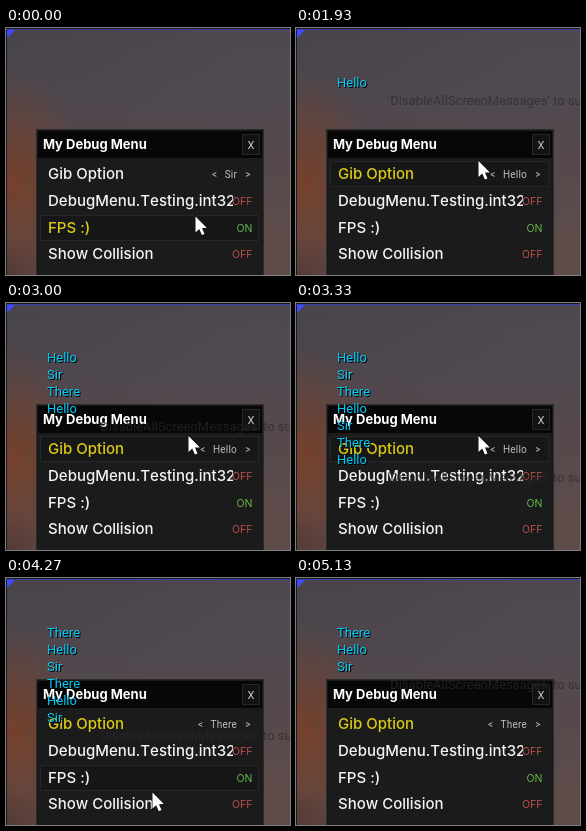
An HTML page with a canvas that plays this animation: 284x247 px, repeating every 5200 ms.

```html
<!DOCTYPE html>
<html>
<head>
<meta charset="utf-8">
<style>
html, body { margin: 0; width: 100%; height: 100%; overflow: hidden; background: #4a464c; }
canvas { display: block; }
</style>
</head>
<body>
<canvas id="stage" width="284" height="247"></canvas>
<script>
const g = document.getElementById('stage').getContext('2d');
const LOOP = 5200, STEP = 200 / 3;
const OPTIONS = ['Sir', 'Hello', 'There'];
const CLICKS = [1500, 2050, 2400, 2800, 3070, 3200, 3330, 3500];
const MESSAGE_LIFE = 2000;
const ROWS = ['Gib Option', 'DebugMenu.Testing.int32', 'FPS :)', 'Show Collision'];
const VALUES = ['', 'OFF', 'ON', 'OFF'];
const INTER = 'Inter, sans-serif', ROBOTO = 'Roboto, sans-serif';

// time, x, y of the pointer tip
const PATH = [[0, 189.5, 188.5], [130, 189.5, 188.5], [800, 182.5, 133], [3740, 182.5, 133],
  [4266, 146.5, 214.5], [4530, 132, 262], [LOOP, 132, 262]];

function pointer(t) {
  const i = PATH.findIndex(p => p[0] > t);
  const [t0, x0, y0] = PATH[i - 1], [t1, x1, y1] = PATH[i];
  const u = (t - t0) / (t1 - t0);
  const e = i === 2 ? u * u * (3 - 2 * u) : i === 4 ? u * u * (2 - u) : u;
  return [x0 + (x1 - x0) * e, y0 + (y1 - y0) * e];
}

function text(s, x, y, font, color, align = 'left') {
  g.font = font;
  g.fontKerning = 'none';
  g.fillStyle = color;
  g.textAlign = align;
  g.fillText(s, x, y);
}

function box(x, y, w, h, fill, line) {
  g.fillStyle = fill;
  g.fillRect(x, y, w, h);
  if (line) {
    g.strokeStyle = line;
    g.lineWidth = 1;
    g.strokeRect(x + .5, y + .5, w - 1, h - 1);
  }
}

function glow(x, y, rx, ry, rgb, alpha) {
  g.save();
  g.translate(x, y);
  g.scale(rx, ry);
  const r = g.createRadialGradient(0, 0, 0, 0, 0, 1);
  r.addColorStop(0, `rgba(${rgb},${alpha})`);
  r.addColorStop(.5, `rgba(${rgb},${alpha * .5})`);
  r.addColorStop(1, `rgba(${rgb},0)`);
  g.fillStyle = r;
  g.fillRect(-1, -1, 2, 2);
  g.restore();
}

function backdrop() {
  const sky = g.createLinearGradient(0, 0, 40, 247);
  sky.addColorStop(0, '#48444a');
  sky.addColorStop(.4, '#50484e');
  sky.addColorStop(.75, '#57494b');
  sky.addColorStop(1, '#5e4c4b');
  g.fillStyle = sky;
  g.fillRect(0, 0, 284, 247);
  glow(250, 40, 170, 90, '82,76,90', .4);
  glow(6, 155, 75, 110, '126,62,34', .8);
  glow(0, 247, 50, 40, '70,40,36', .5);
  box(0, 0, 1, 247, '#19181c');
  box(0, 0, 284, 1, '#19181c');
  box(0, 1, 284, 1, '#3a3fae');
  g.fillStyle = '#3d4cff';
  g.beginPath();
  g.moveTo(1, 2);
  g.lineTo(9, 2);
  g.lineTo(1, 10);
  g.fill();
}

function menu(option, hover, focus) {
  box(30, 101, 228, 160, '#1b1b1c', '#2b2a2b');
  box(32, 103, 224, 27, '#070707');
  text('My Debug Menu', 37, 121, `bold 13px ${INTER}`, '#fff');
  box(236, 106, 18, 21, '#121212', '#262626');
  text('X', 245, 120.5, `11px ${ROBOTO}`, '#c8c8c8', 'center');

  ROWS.forEach((label, i) => {
    const y = Math.round(146 + i * 26.8);
    if (i === hover) box(34, y - 13, 219, 26, '#171717', '#272727');
    g.save();
    g.beginPath();
    g.rect(34, y - 13, 193, 27);
    g.clip();
    text(label, 42, y + 5, `500 15px ${INTER}`, i === focus ? '#dccb16' : '#f4f4f4');
    g.restore();
    if (VALUES[i]) {
      text(VALUES[i], 246.5, y + 4, `10.5px ${INTER}`, VALUES[i] === 'ON' ? '#62b84a' : '#b8504a', 'right');
    } else {
      const font = `10px ${ROBOTO}`, color = '#bdbdbd';
      g.letterSpacing = '.2px';
      text(option, 231, y + 4, font, color, 'right');
      const left = 231 - g.measureText(option).width;
      text('<', left - 10, y + 4, font, color, 'center');
      text('>', 242, y + 4, font, color, 'center');
      g.letterSpacing = '0px';
    }
  });
}

function messages(t) {
  const live = CLICKS.map((at, i) => ({ at, word: OPTIONS[(i + 1) % 3] }))
    .filter(m => t >= m.at && t < m.at + MESSAGE_LIFE).reverse();
  const font = `13px ${ROBOTO}`;
  live.forEach((m, i) => {
    const y = 59 + i * 17;
    text(m.word, 42, y + 1, font, '#000');
    text(m.word, 41, y, font, '#00ccfa');
  });
  if (live.length) {
    text("'DisableAllScreenMessages' to suppress", 92, 59 + live.length * 17 + .5,
      font, 'rgba(44,41,44,.72)');
  }
}

function arrow(x, y) {
  g.save();
  g.translate(x, y);
  g.beginPath();
  [[0, 0], [0, 16], [3.7, 12.6], [6.4, 18.6], [9, 17.4], [6.5, 11.6], [11.4, 11.4]]
    .forEach(p => g.lineTo(...p));
  g.closePath();
  g.lineWidth = 1.4;
  g.strokeStyle = '#111';
  g.stroke();
  g.fillStyle = '#fff';
  g.fill();
  g.restore();
}

function draw(now) {
  const t = Math.floor((now % LOOP + 4) / STEP) * STEP % LOOP;
  const [x, y] = pointer(t);
  const clicked = CLICKS.filter(at => t >= at).length;
  // The highlight trails the pointer slightly
  const trail = y > 200 ? 3 : 0;
  const row = y < 247 ? Math.floor((y - trail - 132.6) / 26.8) : -1;
  backdrop();
  menu(OPTIONS[clicked % 3], row, clicked ? 0 : row);
  messages(t);
  arrow(x, y);
}

const start = performance.now();
function tick() {
  draw(performance.now() - start);
  requestAnimationFrame(tick);
}
tick();
</script>
</body>
</html>
```
